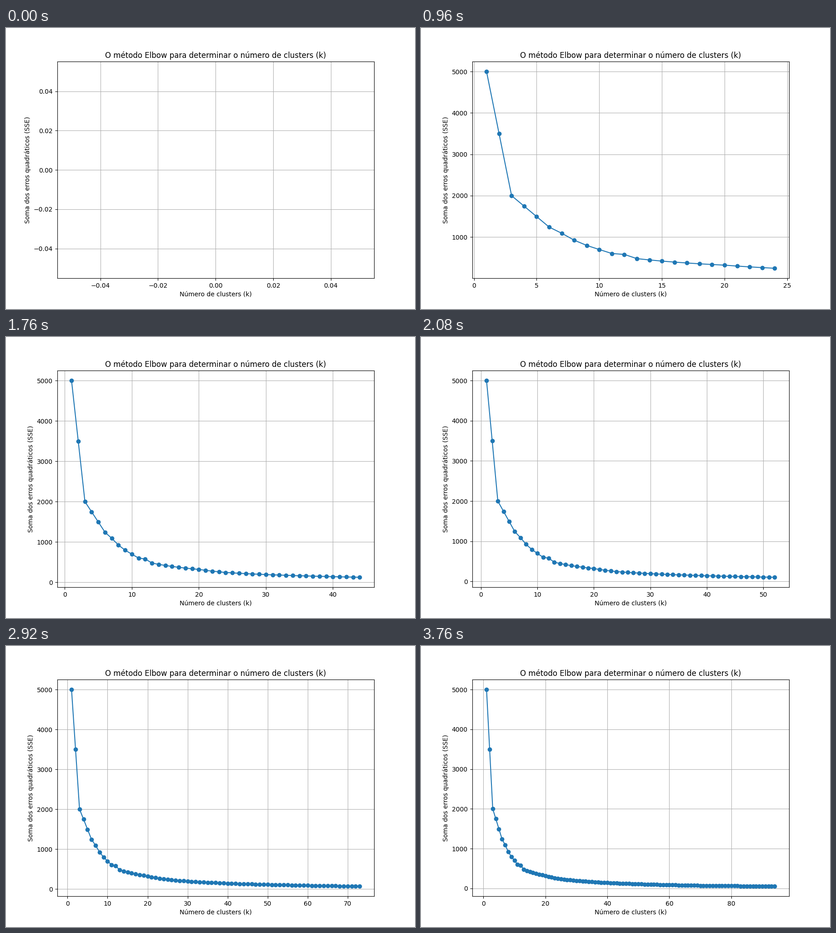
Recreate the animation shown at these times as a matplotlib script. Size 900 px wide and 620 px high, loop 3800 ms.

```python
import matplotlib.pyplot as plt
import numpy as np
from matplotlib.animation import FuncAnimation

FRAMES = 95
INTERVAL = 40

# Key points (k, SSE): straight runs down the elbow, then power-law decay
ELBOW = [(1, 5000), (3, 2000), (6, 1241), (7, 1092)]
TAIL = [(7, 1092), (10, 699), (11, 603), (12, 580), (13, 479),
        (20, 321), (24, 246), (36, 160), (52, 105), (73, 67.2), (94, 53)]


def linear(x, points):
    return np.interp(x, *np.transpose(points))


def power_law(x, points):
    return np.exp(linear(np.log(x), np.log(points)))


k = np.arange(1, FRAMES)
sse = np.where(k < 7, linear(k, ELBOW), power_law(k, TAIL))

plt.rcParams["font.family"] = "DejaVu Sans"
fig, ax = plt.subplots(figsize=(9, 6.2), dpi=100)


def draw(count):
    """Plot the first `count` points; the axes rescale to fit them."""
    ax.clear()
    ax.plot(k[:count], sse[:count], marker="o", color="tab:blue")
    ax.set_title("O método Elbow para determinar o número de clusters (k)")
    ax.set_xlabel("Número de clusters (k)")
    ax.set_ylabel("Soma dos erros quadráticos (SSE)")
    ax.grid(True)


anim = FuncAnimation(fig, draw, frames=FRAMES, init_func=lambda: draw(0),
                     interval=INTERVAL, repeat=True, repeat_delay=0)
plt.show()
```
